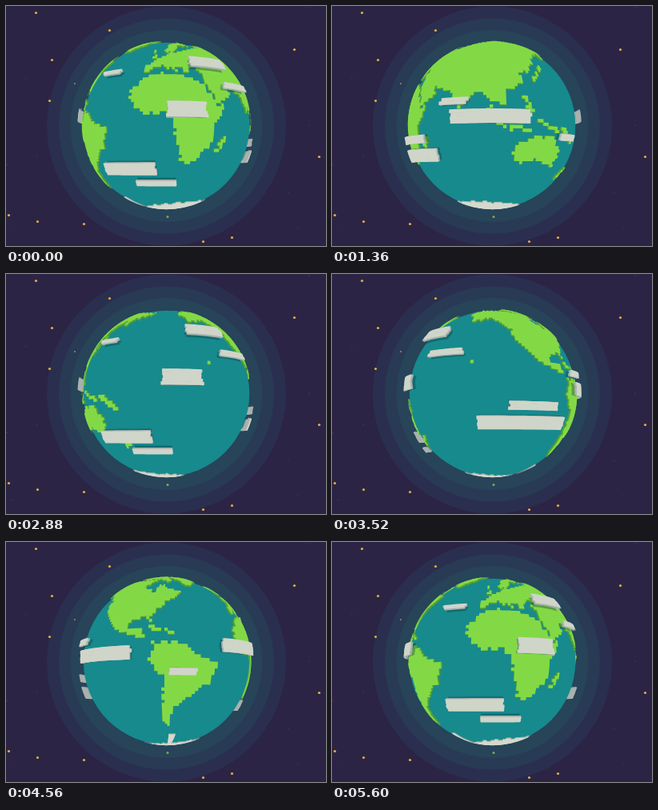
These frames come from a looping animation (400 px wide and 300 px high, 5.76 s). An HTML page with a canvas:

```html
<!DOCTYPE html>
<html>
<head>
<meta charset="utf-8">
<title>Turning globe</title>
<style>
html, body { margin: 0; width: 100%; height: 100%; overflow: hidden; background: #2c2444; }
canvas { display: block; }
</style>
</head>
<body>
<canvas id="stage" width="400" height="300"></canvas>
<script>
const ctx = document.getElementById('stage').getContext('2d');
const LOOP = 5760, STEP = 80, LAST = 70;
const SPIN = 5.04;                      // degrees per step; clouds go twice as fast
const CX = 200.6, CY = 149.4, RADIUS = 103.7;
const RAD = Math.PI / 180;
const CAMERA = 7;                       // distance in globe radii
const ZOOM = RADIUS * Math.sqrt(CAMERA * CAMERA - 1);
const TILT = 4.5 * RAD;
const CELL = 2;                         // block size in degrees

// Key points of each coast: longitude, latitude. Smaller bays come from wobble().
const coasts = {
  africa: [-17,15, -16,23, -6,35, 11,36, 32,31, 43,11, 51,12, 40,-4, 40,-15, 32,-29, 25,-34, 18,-34, 13,-8, 9,4, -8,4],
  eurasia: [-9,37, -9,43, -2,48, 8,54, 30,60, 70,70, 104,77, 140,72, 190,66, 163,60, 157,51, 155,60, 140,54,
    127,38, 119,38, 122,30, 108,20, 109,11, 100,13, 103,2, 97,16, 90,22, 78,8, 70,22, 48,30, 59,22, 44,13,
    35,31, 36,37, 28,41, 40,43, 30,46, 23,37, 13,45, 16,39, 3,43],
  scandinavia: [6,59, 14,68, 28,71, 40,66, 24,66, 14,56],
  northAmerica: [-168,66, -156,71, -82,68, -94,59, -80,52, -77,62, -56,52, -70,43, -81,31, -81,25, -84,30,
    -97,27, -96,19, -88,21, -83,10, -77,8, -94,16, -105,20, -124,40, -124,48, -140,60, -158,56],
  arctic: [-125,73, -90,82, -65,83, -63,65, -80,70, -105,70],
  greenland: [-70,77, -30,83, -22,70, -44,60, -54,70],
  southAmerica: [-77,8, -62,10, -50,0, -35,-6, -40,-21, -48,-27, -58,-36, -65,-42, -67,-55, -74,-52, -71,-19, -81,-5],
  australia: [114,-22, 131,-12, 136,-16, 142,-11, 153,-25, 150,-37, 131,-32, 115,-34]
};

// Island chains run between two points
const chains = {
  madagascar: [45,-24, 49,-14], newZealand: [168,-46, 177,-38], japan: [131,33, 142,44], sumatra: [96,5, 105,-5],
  java: [107,-7, 124,-9], borneo: [112,-1, 116,4], newGuinea: [132,-2, 147,-8], melanesia: [152,-5, 167,-17],
  philippines: [121,17, 125,7], caribbean: [-83,22, -67,18], britain: [-3,51, -4,58], hawaii: [-156,20, -155,20]
};

// Middle longitude and latitude, width and height of each cloud, in degrees
const clouds = [
  [12, 5, 25, 9], [-27, -30, 42, 8], [-8, -40, 34, 4], [-41, 30, 19, 3], [33, 37, 33, 8], [52, 21, 28, 4],
  [-93, 6, 37, 8], [170, 1, 49, 8], [110, -11, 35, 5], [105, -21, 62, 8], [224, -10, 19, 4], [148, 10, 19, 4]
];
const stars = [[37,8], [129,30], [57,67], [54,118], [360,54], [391,188], [3,261], [39,269], [97,272], [246,294], [282,289]];

const random = n => {
  const s = Math.sin(n * 127.1 + 3.7) * 43758.5;
  return s - Math.floor(s);
};
const wobble = a => 0.8 * Math.sin(a * 0.9);

function inside(shape, x, y) {
  let hit = false;
  for (let i = 0, j = shape.length - 2; i < shape.length; j = i, i += 2) {
    const [ax, ay, bx, by] = [shape[i], shape[i + 1], shape[j], shape[j + 1]];
    if (ay > y !== by > y && x < (bx - ax) * (y - ay) / (by - ay) + ax) hit = !hit;
  }
  return hit;
}

function onChain([ax, ay, bx, by], x, y) {
  const dx = bx - ax, dy = by - ay;
  const t = Math.max(0, Math.min(1, ((x - ax) * dx + (y - ay) * dy) / (dx * dx + dy * dy)));
  return Math.hypot(x - ax - t * dx, y - ay - t * dy) < 1.8;
}

function isLand(lon, lat) {
  const x = lon + wobble(lat), y = lat + wobble(lon);
  return Object.values(coasts).some(c => inside(c, x, y)) ||
    random(lon + lat * 7) > 0.2 && Object.values(chains).some(c => onChain(c, lon, lat));
}

function isIce(lon, lat) {
  const coast = -73.5 + 4.5 * Math.cos((lon - 75) * RAD) + wobble(lon / 3);
  const peninsula = Math.abs(lon + 62) < 4 && lat < -64;
  return lat < coast || peninsula;
}

// The flat map follows Miller's projection, slightly squeezed
const MAP_X = 0.935, MAP_SHIFT = 7.5, MAP_Y = 0.764;
const toLongitude = u => (u + MAP_SHIFT) / MAP_X;
const toLatitude = v => (Math.atan(Math.exp(0.8 * v * RAD / MAP_Y)) / RAD - 45) * 2.5;

function buildGround() {
  const land = [], ice = [];
  for (let v = -88; v < 88; v += CELL) {
    for (let u = -180; u < 180; u += CELL) {
      const lon = toLongitude(u + CELL / 2), lat = toLatitude(v + CELL / 2);
      const cell = { u, v, w: CELL, h: CELL };
      if (isIce(lon, lat)) ice.push(cell);
      else if (isLand(lon, lat)) land.push(cell);
    }
  }
  return { land, ice };
}

function buildClouds() {
  const cells = [];
  clouds.forEach(([lon, lat, width, height], n) => {
    const rows = Math.round(height / 2), h = height / rows;
    for (let r = 0; r < rows; r++) {
      const from = lon - width / 2 + random(n * 9 + r) * 1.8;
      const to = lon + width / 2 - random(n * 5 + r + 50) * 1.8;
      const count = Math.ceil((to - from) / 3), w = (to - from) / count;
      for (let i = 0; i < count; i++) cells.push({ u: from + i * w, v: lat - height / 2 + r * h, w, h });
    }
  });
  return cells;
}

const { land, ice } = buildGround();
const cloudCells = buildClouds();

function locate(u, v, r) {
  const a = u * RAD, b = v * RAD;
  const x = Math.cos(b) * Math.sin(a), y = Math.sin(b), z = Math.cos(b) * Math.cos(a);
  const up = y * Math.cos(TILT) + z * Math.sin(TILT);
  const near = z * Math.cos(TILT) - y * Math.sin(TILT);
  const s = ZOOM * r / (CAMERA - near * r);
  return { x: CX + x * s, y: CY - up * s, near };
}

function split(cells, turn) {
  const front = [], back = [];
  for (const c of cells) {
    const { near } = locate(c.u + c.w / 2 - turn, c.v + c.h / 2, 1);
    if (near > 1 / CAMERA) front.push(c);
    else if (near > -0.3) back.push(c);
  }
  return { front, back };
}

function fillCells(cells, turn, r, color) {
  ctx.beginPath();
  for (const { u, v, w, h } of cells) {
    const a = u - turn;
    [[a, v], [a + w, v], [a + w, v + h], [a, v + h]].forEach(([lon, lat], i) => {
      const p = locate(lon, lat, r);
      if (i) ctx.lineTo(p.x, p.y); else ctx.moveTo(p.x, p.y);
    });
    ctx.closePath();
  }
  ctx.fillStyle = color;
  ctx.fill();
}

function slab(cells, turn, low, high, side, top) {
  for (let i = 0; i < 3; i++) fillCells(cells, turn, low + (high - low) * i / 3, side);
  fillCells(cells, turn, high, top);
}

function disc(x, y, r, color) {
  ctx.beginPath();
  ctx.arc(x, y, r, 0, 2 * Math.PI);
  ctx.fillStyle = color;
  ctx.fill();
}

function drawSky() {
  ctx.fillStyle = '#2c2444';
  ctx.fillRect(0, 0, 400, 300);
  disc(200.5, 150, 149.5, '#2b2f4f');
  disc(200.5, 150, 134.5, '#293a54');
  disc(200.5, 150, 120, '#274459');
  for (let i = 0; i < 8; i++) disc(i % 2 * 350 + random(i) * 50, random(i + 20) * 300, 0.7, '#4b3d5e');
  stars.forEach(([x, y]) => disc(x + 0.5, y + 0.5, 1.6, '#deb045'));
  disc(86, 97, 1, '#a88a4c');
  disc(202, 263.5, 1.5, '#86a657');
}

function draw(step) {
  const turn = step * SPIN, drift = turn * 2;
  const ground = split(land, turn), snow = split(ice, turn), sky = split(cloudCells, drift);
  const drawLand = cells => slab(cells, turn, 1, 1.02, '#559f30', '#83d945');
  drawSky();
  slab(sky.back, drift, 1.05, 1.07, '#8f9a9e', '#a9b1ae');
  drawLand(ground.back);
  disc(CX, CY, RADIUS, '#178a8d');
  slab(snow.front, turn, 1, 1.01, '#a9b5ab', '#d5d9cd');
  drawLand(ground.front);
  fillCells(sky.front, drift, 1.01, 'rgba(10,50,55,0.35)');
  slab(sky.front, drift, 1.045, 1.07, '#a9b1ae', '#d0d5c9');
}

const start = performance.now();
let shown = -1;
function tick() {
  const time = (performance.now() - start) % LOOP;
  const step = Math.min(LAST, Math.floor(time / STEP));
  if (step !== shown) draw(shown = step);
  requestAnimationFrame(tick);
}
tick();
</script>
</body>
</html>
```
